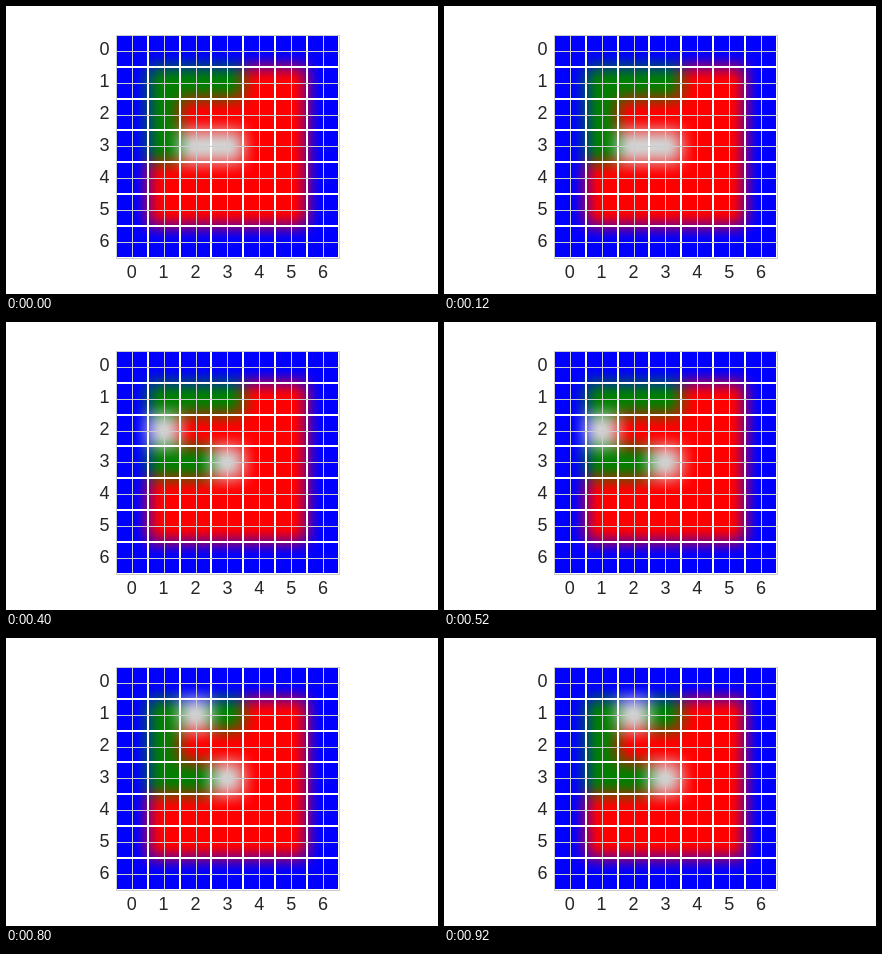
Write an HTML page with a canvas that moves like this. It is 432 by 288 pixels and loops after 1000 ms.

```html
<!DOCTYPE html>
<html lang="en">
<head>
<meta charset="utf-8">
<title>Grid walk</title>
<style>
html, body { margin: 0; width: 100%; height: 100%; overflow: hidden; background: #fff; }
canvas { display: block; }
</style>
</head>
<body>
<canvas width="432" height="288"></canvas>
<script>
const ctx = document.querySelector('canvas').getContext('2d');
const N = 7, LEFT = 109.8, TOP = 28.8, CELL = 223.2 / N;
const X0 = 110, Y0 = 29, SIZE = 223;
const STEP_MS = 200;

const COLORS = { b: [0, 0, 255], g: [0, 128, 0], r: [255, 0, 0], w: [211, 211, 211] };
const MAP = ['bbbbbbb', 'bgggrrb', 'bgrrrrb', 'bggwrrb', 'brrrrrb', 'brrrrrb', 'bbbbbbb'];
const PATH = [[2, 3], [1, 3], [1, 2], [1, 1], [2, 1]]; // walker's column, row

// Neighbouring cell indices and the smooth blend between them at one pixel
function sample(pixel, origin) {
  const u = Math.min(N - 1, Math.max(0, (pixel + 0.5 - origin) / CELL - 0.5));
  const i = Math.min(N - 2, Math.floor(u)), t = u - i;
  return [i, t * t * (3 - 2 * t)];
}

const mix = (a, b, t) => a + (b - a) * t;

function drawField([col, row]) {
  const cells = MAP.map(line => [...line].map(c => COLORS[c]));
  cells[row][col] = COLORS.w;
  const img = ctx.createImageData(SIZE, SIZE);
  let p = 0;
  for (let y = 0; y < SIZE; y++) {
    const [j, ty] = sample(Y0 + y, TOP);
    for (let x = 0; x < SIZE; x++) {
      const [i, tx] = sample(X0 + x, LEFT);
      for (let c = 0; c < 3; c++) {
        img.data[p++] = mix(
          mix(cells[j][i][c], cells[j][i + 1][c], tx),
          mix(cells[j + 1][i][c], cells[j + 1][i + 1][c], tx), ty);
      }
      img.data[p++] = 255;
    }
  }
  ctx.putImageData(img, X0, Y0);
}

function drawLines(vertical) {
  const line = (pos, width) => vertical
    ? ctx.fillRect(pos, Y0, width, SIZE)
    : ctx.fillRect(X0, pos, SIZE, width);
  const origin = vertical ? LEFT : TOP;
  ctx.fillStyle = '#ccc';
  for (let i = 0; i < N; i++) line(Math.round(origin + (i + 0.5) * CELL), 1);
  ctx.fillStyle = '#fff';
  for (let i = 0; i <= N; i++) line(Math.round(origin + i * CELL) - 1, 2);
}

function drawLabels() {
  ctx.fillStyle = '#262626';
  ctx.font = '18px "Liberation Sans", Arial, sans-serif';
  ctx.textAlign = 'center';
  for (let i = 0; i < N; i++) {
    const mid = (i + 0.5) * CELL;
    ctx.fillText(i, LEFT + mid, 272);
    ctx.fillText(i, 98.5, Math.round(TOP + mid + 4.5));
  }
}

function draw(step) {
  ctx.fillStyle = '#fff';
  ctx.fillRect(0, 0, 432, 288);
  drawField(PATH[step]);
  drawLines(true);
  drawLines(false);
  ctx.strokeStyle = '#ccc';
  ctx.strokeRect(X0 + 0.5, Y0 + 0.5, SIZE, SIZE);
  drawLabels();
}

let shown = -1;
function tick() {
  const step = Math.floor(performance.now() / STEP_MS) % PATH.length;
  if (step !== shown) draw(shown = step);
  requestAnimationFrame(tick);
}
tick();
</script>
</body>
</html>
```
